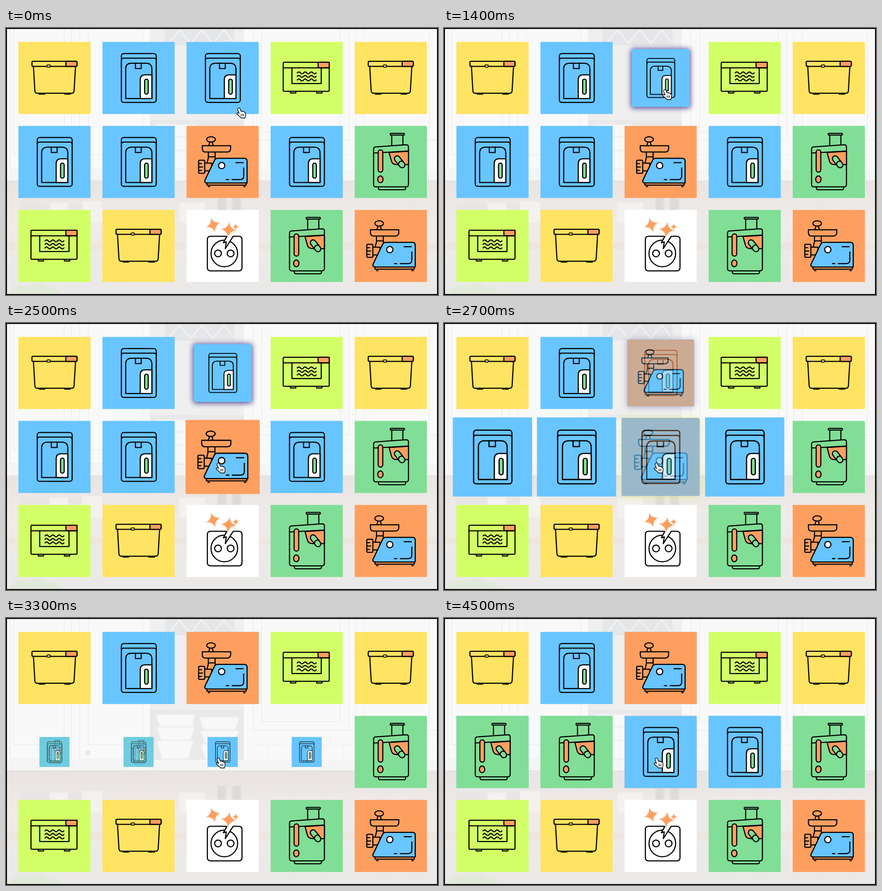
Write an HTML page that moves like this. It is 892 by 552 pixels and loops after 4600 ms.

```html
<!DOCTYPE html>
<html lang="en">
<head>
<meta charset="utf-8">
<title>Kitchen match three</title>
<style>
html, body { margin: 0; width: 100%; height: 100%; overflow: hidden; background: #f9f9f9; }
svg { display: block; }
.bg { width: 149px; height: 149px; rx: var(--r, 0px); stroke: none; }
.icon { fill: none; stroke: #000; stroke-width: 2.3; stroke-linecap: round; stroke-linejoin: round; }
.o { fill: #ff9f5f; }
.b { fill: #68c5ff; }
.g { fill: #81de96; }
.w { fill: #fff; }
.y { fill: #ffe362; }
.l { fill: #d3ff66; }
.soft { filter: blur(1.5px); }
</style>
</head>
<body>
<svg id="stage" width="892" height="552" viewBox="0 0 892 552">
<defs>
  <linearGradient id="counter" x1="0" y1="0" x2="0" y2="1">
    <stop offset="0" stop-color="#e9e4e2"/>
    <stop offset=".35" stop-color="#efebe9"/>
    <stop offset="1" stop-color="#eae9e7"/>
  </linearGradient>

  <g id="cooler" class="icon">
    <rect class="bg b"/>
    <rect x="39" y="24" width="72" height="101" rx="5"/>
    <path d="M39 38Q39 33.500 44 33.500H106Q111 33.500 111 38"/>
    <path d="M48 117V56Q48 44 60 44H90Q102 44 102 56V117Z"/>
    <path d="M68 44V55H80V44"/>
    <path class="w" d="M78 117V78Q78 68 88 68H102V117Z"/>
    <rect class="g" x="87" y="77" width="7.500" height="31" rx="3.700"/>
  </g>

  <g id="box" class="icon">
    <rect class="bg y"/>
    <path d="M31 50L34 101Q34.500 106 39 106H110Q114.500 106 115 101L118 50"/>
    <rect x="28" y="40" width="93" height="10.500" rx="2"/>
    <path class="o" d="M98 40H119Q121 40 121 42V48Q121 50.500 119 50.500H98Z"/>
    <rect class="y" x="59" y="47.500" width="7" height="4.500" rx="1.500" stroke-width="1.800"/>
    <path d="M43 107.500H54M96 107.500H107" stroke-width="3"/>
  </g>

  <g id="oven" class="icon">
    <rect class="bg l"/>
    <rect x="26" y="42" width="95" height="60" rx="2"/>
    <path class="o" d="M98 42H121V53.500H101Q98 53.500 98 50Z"/>
    <path d="M26 53.500H121M44 54V86H104.500V54"/>
    <path id="wave" d="M55 64q3.250-4 6.500 0t6.500 0t6.500 0t6.500 0t6.500 0t6.500 0"/>
    <use href="#wave" y="7.300"/><use href="#wave" y="14.600"/>
    <path d="M41 103V105.500H52V103M95 103V105.500H106V103"/>
  </g>

  <g id="grinder" class="icon">
    <rect class="bg o"/>
    <path d="M46 41L48 33M55 41L53 33M45 54V66L42 78M59 54V67"/>
    <path d="M45 64H59"/>
    <ellipse class="o" cx="50.500" cy="28" rx="9" ry="5.500"/>
    <path class="o" d="M32.500 41H91V48Q90 54 84 54H39Q33 54 32.500 48Z"/>
    <path class="o" d="M37 77H52V93H37Z"/>
    <rect class="o" x="25" y="71" width="12.500" height="27" rx="2"/>
    <path d="M25 78H31M25 85H33M25 92H31"/>
    <path class="b" d="M38 112L58 70.500Q60 67 64 67H119Q125 67 125 73V118H43Q36 118 38 112Z"/>
    <circle class="w" cx="72.500" cy="82" r="6.500"/>
    <path d="M102 76H117M82 111H87M94 111H110Q118 111 118 104V87"/>
    <path d="M42 118V122.500H123V118M45 125.500H48M118 125.500H121"/>
  </g>

  <g id="juicer" class="icon">
    <rect class="bg g"/>
    <path d="M76.500 19V42M99.500 19V40M49 126V129Q49 132 53 132H101Q105 132 105 129V126"/>
    <rect class="g" x="73.500" y="15.500" width="29" height="3.500" rx="1"/>
    <path class="g" d="M39 54V48Q39 44 43 43.500L106 39Q111 39 111 43V121Q111 126 106 126H44Q39 126 39 121Z"/>
    <path d="M39 56L111 52"/>
    <path class="o" d="M71 55L111 52.500V80H87Q78 80 76 73Z"/>
    <rect class="o" x="48.500" y="49.500" width="9.500" height="46" rx="4.700"/>
    <ellipse class="o" cx="53" cy="110.500" rx="5.500" ry="7"/>
    <g transform="rotate(-38 93 74)">
      <rect class="g" x="87" y="60" width="11.500" height="28" rx="5.700"/>
      <path d="M87 77Q93 71 98.500 77"/>
    </g>
  </g>

  <path id="spark" d="M0-1Q.14-.14 1 0Q.14.14 0 1Q-.14.14-1 0Q-.14-.14 0-1Z" fill="#ff9f5f" stroke="none"/>
  <g id="socket" class="icon">
    <rect class="bg w"/>
    <rect x="43" y="54.500" width="71.500" height="71.500" rx="6"/>
    <circle cx="78" cy="90" r="27.500"/>
    <path class="w" stroke="none" d="M83 50V55L76 68L82 66L80 80L96 55V50Z"/>
    <path d="M83 55L76 68L82 66L80 80L96 55"/>
    <circle cx="65" cy="90" r="7"/><circle cx="91" cy="90" r="7"/>
    <use href="#spark" transform="translate(55 31) rotate(-17) scale(15.500)"/>
    <use href="#spark" transform="translate(87 41) rotate(6) scale(16.500)"/>
    <use href="#spark" transform="translate(101.500 35) scale(7)"/>
  </g>
</defs>

<rect width="892" height="552" fill="#f9f9f9"/>
<g fill="none" stroke="#f0f0f0" stroke-width="2">
  <path d="M8 0V291H135V0M16 0V262H120V0M152 0V291H297M170 0V262H282V0"/>
  <path d="M510 0V232H708V0M528 0V214H690V0M722 0V232H892M740 0V214H874V0"/>
  <path d="M512 262H892M540 262V315M566 262V315M592 262V315M618 262V315M644 262V315M670 262V315M696 262V315M722 262V315" stroke-width="1"/>
</g>
<circle cx="169" cy="279" r="5.500" fill="#e9e9e9"/>
<path d="M297 0H491V293H297Z" fill="#efefef"/>
<path d="M328 0H472V36H328Z" fill="#e5e6e8"/>
<path d="M335 32L358 4L381 32L404 4L427 32L450 4L470 30" fill="none" stroke="#f1f1f2" stroke-width="3"/>
<path d="M297 190H491V293H297Z" fill="#e9e9e9"/>
<g class="soft" fill="#f8f8f8">
  <path d="M309 200H390L384 224H318ZM311 226H389L380 252H320ZM311 254H387L376 291H322Z"/>
  <path d="M400 205H481L474 230H408ZM402 233H480L471 258H411ZM402 261H480L470 291H412Z"/>
</g>
<path d="M0 293H892V315H0Z" fill="#f6f5f5"/>
<path d="M0 315H892V552H0Z" fill="url(#counter)"/>
<g class="soft">
  <path d="M25 362H190V376H25Z" fill="#e8e6e4"/>
  <path d="M90 361H128V402H90ZM157 358H199V402H157ZM358 361H411V402H358Z" fill="#f3f2f1"/>
  <path d="M437 347H454V378H437ZM467 347H485V378H467Z" fill="#dcdbda"/>
  <path d="M0 444H380V458H0ZM520 444H892V458H520Z" fill="#ede5df"/>
  <path d="M5 552Q20 525 44 535Q70 520 86 536Q104 532 114 552Z" fill="#e0e9da"/>
</g>

<g id="board"></g>
<g id="cursor">
  <path d="M4 2C6-.5 8 1 8.500 3L10.500 8C12 6.500 13.500 7 14 8.500C15.500 7.500 17 8 17.300 10C19 9.500 19.700 11 19.700 13C20 17 19 19 18.500 21.500H10.500C8.500 18.500 5 16.500 2.500 14C.5 11.800 2.500 10 5 11.500L6.500 12.300L3.500 5Q3 3 4 2Z" fill="#fff" stroke="#000" stroke-width="1.300" stroke-linejoin="round"/>
  <path d="M10.500 13V18M13 13V18M15.500 13V18" stroke="#000"/>
</g>
<rect x="1" y="1" width="890" height="550" fill="none" stroke="#000" stroke-width="2"/>
</svg>

<script>
const LOOP = 4600, STEP = 100;
const start = [
  'cooler-box', 'cooler', 'cooler', 'oven', 'box',
  'cooler', 'cooler', 'grinder', 'cooler', 'juicer',
  'oven', 'box', 'socket', 'juicer', 'grinder'
];
start[0] = 'box';
const after = { 2: 'grinder', 5: 'juicer', 6: 'juicer', 7: 'cooler', 8: 'cooler' };
const PURPLE = '#35247f', LIME = '#d9e88c';

const part = (t, from, length) => Math.min(1, Math.max(0, (t - from) / length));
const mix = (a, b, p) => a + (b - a) * p;
const smooth = p => p * p * (3 - 2 * p);
const outCubic = p => 1 - (1 - p) ** 3;
const backIn = (p, s = 1.70158) => p * p * ((s + 1) * p - s);
const backOut = (p, s) => 1 - backIn(1 - p, s);

const board = document.getElementById('board');
const cursor = document.getElementById('cursor');

const tiles = start.map((kind, i) => {
  const x = 100.1 + 173.6 * (i % 5), y = 103.3 + 173.65 * Math.floor(i / 5);
  board.insertAdjacentHTML('beforeend', `<g>
    <rect x="-76" y="-75" width="152" height="153" rx="5" style="filter:blur(7px)" opacity="0"/>
    <use href="#${kind}" x="-74.5" y="-74.5"/>
    <use href="#${after[i] || kind}" x="-74.5" y="-74.5" opacity="0"/></g>`);
  const node = board.lastElementChild;
  return { node, x, y, glow: node.children[0], next: node.children[2] };
});

function pose(i, t) {
  const swap = part(t, 2500, 300);
  if (i === 2) {
    const picked = smooth(part(t, 1000, 350));
    const scale = t < 2600 ? mix(1, 0.8, picked) : mix(0.8, 1, outCubic(part(t, 2500, 700)));
    const glow = picked * (1 - swap);
    return { scale, glow, color: PURPLE, fade: swap };
  }
  if (i >= 5 && i <= 8) {
    const clicked = i === 7;
    const shrink = clicked ? part(t, 2418, 549) : part(t, 2500, 445);
    const scale = t < 3200 ? 1 - backIn(shrink) : backOut(part(t, 3210, 800), 1.3);
    return {
      scale, color: LIME,
      glow: clicked && t < 3200 ? swap : 0,
      fade: clicked ? swap : part(t, 3200, 330)
    };
  }
  return { scale: 1, glow: 0, color: PURPLE, fade: 0 };
}

function draw(t) {
  tiles.forEach(({ node, x, y, glow, next }, i) => {
    const p = pose(i, t);
    node.setAttribute('transform', `translate(${x} ${y}) scale(${Math.max(0, p.scale)})`);
    node.style.setProperty('--r', 5 * p.glow + 'px');
    glow.setAttribute('fill', p.color);
    glow.setAttribute('opacity', p.glow * 0.85);
    next.setAttribute('opacity', p.fade);
  });
  const a = smooth(part(t, 500, 400)), b = smooth(part(t, 1600, 600));
  const cx = mix(mix(475, 450, a), 432.5, b);
  const cy = mix(mix(164.5, 126.5, a), 288.5, b);
  cursor.setAttribute('transform', `translate(${cx} ${cy})`);
}

const begin = performance.now();
function tick() {
  const t = (performance.now() - begin) % LOOP;
  draw(Math.floor(t / STEP) * STEP);
  requestAnimationFrame(tick);
}
tick();
</script>
</body>
</html>
```
